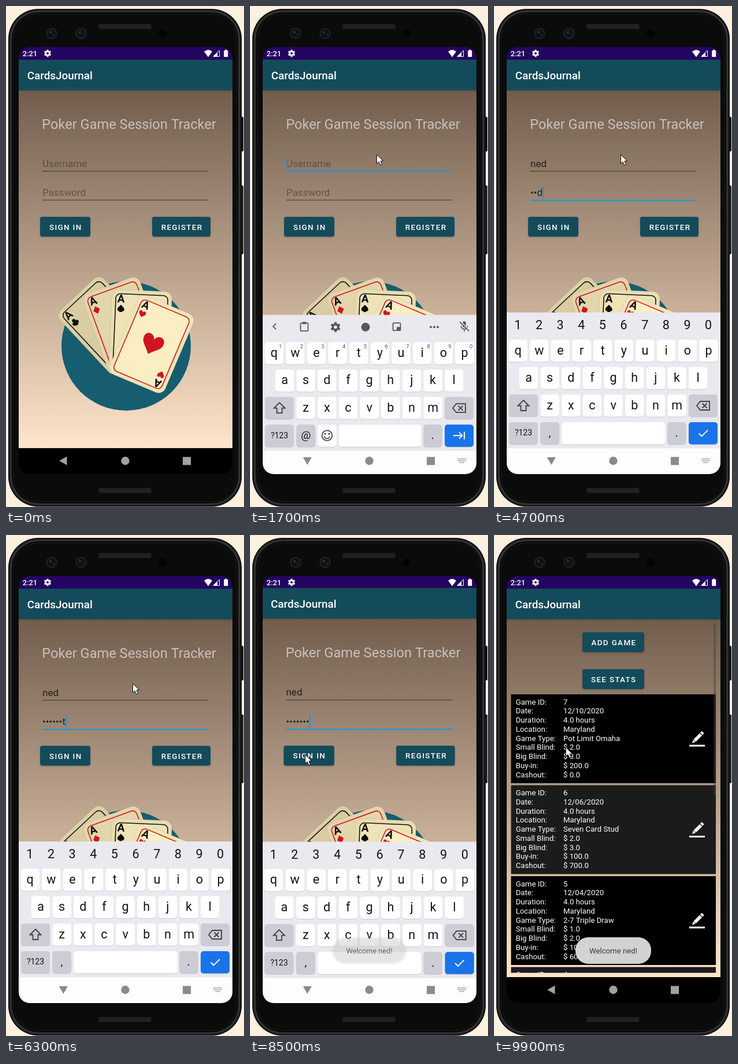
An HTML page with a canvas that plays this animation: 412 by 868 pixels, repeating every 10000 ms.

```html
<!DOCTYPE html>
<html lang="en">
<head>
<meta charset="utf-8">
<title>Session tracker</title>
<style>
html, body { margin: 0; width: 100%; height: 100%; overflow: hidden; background: #fdf0df; }
canvas { display: block; width: 412px; height: 868px; }
</style>
</head>
<body>
<canvas id="stage"></canvas>
<script>
const W = 412, H = 868, LOOP = 10000;
const cv = document.getElementById('stage'), c = cv.getContext('2d');
const dpr = window.devicePixelRatio || 1;
cv.width = W * dpr;
cv.height = H * dpr;

const APP = 'CardsJournal', USER = 'ned', PASS = 'nedsuit';
const TEAL = '#144b5a', BLUE = '#2196d6', RED = '#d01421';
const USER_KEYS = [2400, 2600, 2800];
const PASS_KEYS = [4000, 4350, 4600, 5000, 5400, 5800, 6200];
const FOCUS = 1300, NEXT = 3500, OPEN = 8450;

const clamp = v => Math.max(0, Math.min(1, v));
const span = (t, a, b) => clamp((t - a) / (b - a));
const ease = p => p * p * (3 - 2 * p);
const out = p => 1 - Math.pow(1 - p, 3);

function rect(x, y, w, h, fill) {
  c.fillStyle = fill;
  c.fillRect(x, y, w, h);
}
function round(x, y, w, h, r, fill) {
  c.beginPath();
  c.roundRect(x, y, w, h, r);
  if (fill) { c.fillStyle = fill; c.fill(); }
}
function ring(x, y, w, h, r, color, lw) {
  round(x, y, w, h, r);
  c.strokeStyle = color;
  c.lineWidth = lw;
  c.stroke();
}
function disc(x, y, r, fill) {
  c.beginPath();
  c.arc(x, y, r, 0, 7);
  c.fillStyle = fill;
  c.fill();
}
function trace(p, close) {
  c.beginPath();
  for (let i = 0; i < p.length; i += 2) c.lineTo(p[i], p[i + 1]);
  if (close) c.closePath();
}
function poly(p, fill) {
  trace(p, true);
  c.fillStyle = fill;
  c.fill();
}
function line(p, color, lw, close) {
  trace(p, close);
  c.strokeStyle = color;
  c.lineWidth = lw;
  c.stroke();
}
function text(s, x, y, size, color, weight = 400, align = 'left', gap = 0) {
  c.font = `${weight} ${size}px Roboto, sans-serif`;
  c.letterSpacing = gap + 'px';
  c.textAlign = align;
  c.fillStyle = color;
  c.fillText(s, x, y);
}
function layer(fn) {
  c.save();
  fn();
  c.restore();
}

function gear(x, y, r, color, hole) {
  disc(x, y, r * 0.75, color);
  layer(() => {
    c.translate(x, y);
    for (let i = 0; i < 6; i++) {
      rect(-r * 0.25, -r, r * 0.5, r * 0.5, color);
      c.rotate(Math.PI / 3);
    }
  });
  disc(x, y, r * 0.33, hole);
}

function phone() {
  rect(0, 0, W, H, '#fdf0df');
  round(405, 192, 6, 60, 2, '#111');
  round(405, 311, 6, 119, 2, '#111');
  rect(408.5, 314, 1, 112, '#444');
  round(4, 5, 404, 862.5, 52, '#0b0b0b');
  ring(7.5, 8.5, 397, 855.5, 49, '#2a2a2c', 3);
  ring(9, 10, 394, 852.5, 47.5, '#48484a', 1);
  ring(13, 14, 386, 844.5, 43.5, '#1b1b1c', 1);
  for (let y = 0; y < 2; y++) {
    [31, 835].forEach(top => {
      if (!y) round(160, top, 92, 9, 4, '#1e1e1e');
      c.setLineDash([1.5, 2]);
      line([164, top + 3 + 3 * y, 249, top + 3 + 3 * y], '#2e2e2e', 1.5);
      c.setLineDash([]);
    });
  }
  [79, 130].forEach(x => {
    disc(x, 47.5, 10, '#1d1e20');
    disc(x, 47.5, 7, '#0e0f12');
    disc(x - 2, 45.5, 2, '#34373d');
    disc(x + 3, 49.5, 1.6, '#2a2c31');
  });
  disc(271, 47.5, 7, '#030303');
}

function heart(s) {
  c.beginPath();
  c.moveTo(0, s);
  c.bezierCurveTo(-0.3 * s, 0.55 * s, -s, 0.2 * s, -s, -0.35 * s);
  c.bezierCurveTo(-s, -1.05 * s, -0.15 * s, -1.05 * s, 0, -0.45 * s);
  c.bezierCurveTo(0.15 * s, -1.05 * s, s, -1.05 * s, s, -0.35 * s);
  c.bezierCurveTo(s, 0.2 * s, 0.3 * s, 0.55 * s, 0, s);
  c.fill();
}
function pip(kind, x, y, s) {
  layer(() => {
    c.translate(x, y);
    const color = kind === 'heart' || kind === 'diamond' ? RED : '#0a0a0a';
    c.fillStyle = color;
    if (kind === 'heart') return heart(s);
    if (kind === 'diamond') return poly([0, -s * 1.15, s, 0, 0, s * 1.15, -s, 0], color);
    poly([0, 0, s * 0.45, s * 1.1, -s * 0.45, s * 1.1], color);
    if (kind === 'spade') {
      c.scale(1, -1);
      heart(s);
    } else {
      [[0, -0.5], [-0.52, 0.3], [0.52, 0.3]].forEach(p => disc(p[0] * s, p[1] * s, s * 0.5, color));
    }
  });
}
function card(x, y, deg, kind, rim, face) {
  layer(() => {
    c.translate(x, y);
    c.rotate(deg * Math.PI / 180);
    layer(() => {
      c.shadowColor = 'rgba(60,45,20,.22)';
      c.shadowBlur = 2 * dpr;
      round(-52, -74, 104, 148, 13, rim);
    });
    const ink = kind === 'heart' || kind === 'diamond' ? RED : '#111';
    round(-45, -67, 90, 134, 8, face);
    ring(-45, -67, 90, 134, 8, ink, 1.6);
    const corner = () => {
      text('A', -35.8, -52, 19, '#0a0a0a', 700, 'center');
      pip(kind, -35.5, -42, 6);
    };
    corner();
    if (kind === 'heart') {
      pip(kind, 1, -0.5, 18.5);
      c.rotate(Math.PI);
      corner();
    }
  });
}

function backdrop() {
  const g = c.createLinearGradient(0, 146, 0, 766);
  g.addColorStop(0, '#725d4d');
  g.addColorStop(1, '#ffe5ca');
  rect(22, 93, 370, 673, g);
  const s = c.createLinearGradient(0, 146, 0, 150);
  s.addColorStop(0, 'rgba(0,0,0,.12)');
  s.addColorStop(1, 'rgba(0,0,0,0)');
  rect(22, 146, 370, 4, s);
  rect(22, 71, 370, 22, '#240460');
  rect(22, 93, 370, 53, TEAL);
  text(APP, 36.7, 127, 18.85, '#fff', 500);
}
function button(x, y, w, label, tx) {
  layer(() => {
    c.shadowColor = 'rgba(0,0,0,.28)';
    c.shadowBlur = 2.5 * dpr;
    c.shadowOffsetY = dpr;
    round(x, y, w, 34.3, 3.8, TEAL);
  });
  text(label, tx, y + 22.3, 13.4, '#fff', 500, 'left', 1.35);
}

function field(y, value, hint, active, caret, composing) {
  if (value) text(value, 63, y - 7, 17, '#24201b');
  else text(hint, 63, y - 7, 17, 'rgba(50,38,26,.52)');
  c.font = '400 17px Roboto, sans-serif';
  const end = 63 + (value ? c.measureText(value).width : 0);
  if (composing) rect(63, y - 5.5, end - 63, 1, '#24201b');
  if (active) rect(63, y - 0.2, 287, 2.1, BLUE);
  else rect(63, y - 0.4, 287, 1.4, 'rgba(40,30,20,.55)');
  if (caret) rect(end + 0.3, y - 24.5, 2, 23, BLUE);
}

const typed = (keys, t) => keys.filter(k => k <= t).length;
function blink(t, marks) {
  const last = Math.max(...marks.filter(m => m <= t));
  return (t - last) % 1000 < 500;
}
function secret(t) {
  const n = typed(PASS_KEYS, t);
  if (!n) return '';
  const shown = t - PASS_KEYS[n - 1] < 1200;
  return '•'.repeat(n - 1) + (shown ? PASS[n - 1] : '•');
}

function login(t) {
  backdrop();
  text('Poker Game Session Tracker', 62.3, 212.5, 23.62, '#c9c0ba');
  const onUser = t >= FOCUS && t < NEXT, onPass = t >= NEXT;
  const name = USER.slice(0, typed(USER_KEYS, t));
  field(286, name, 'Username', onUser, onUser && blink(t, [FOCUS, ...USER_KEYS]), onUser && name);
  field(336, secret(t), 'Password', onPass, onPass && blink(t, [NEXT, ...PASS_KEYS]));
  button(59, 365.3, 87, 'SIGN IN', 75);
  button(253, 365.3, 101, 'REGISTER', 268.7);
  disc(208, 589, 112, '#165d70');
  card(174, 554, -43, 'club', '#dccfa4', '#d9cca2');
  card(204.5, 554, -20, 'diamond', '#e2d5a9', '#e2d6ac');
  card(232.5, 567, 2.5, 'spade', '#e9dcaf', '#efe3b8');
  card(252, 586, 23, 'heart', '#f1e4b8', '#faeec2');
}

const LABELS = ['Game ID:', 'Date:', 'Duration:', 'Location:', 'Game Type:',
  'Small Blind:', 'Big Blind:', 'Buy-in:', 'Cashout:'];
const GAMES = [
  ['7', '12/10/2020', 'Pot Limit Omaha', '2.0', '3.0', '200.0', '0.0'],
  ['6', '12/06/2020', 'Seven Card Stud', '2.0', '3.0', '100.0', '700.0'],
  ['5', '12/04/2020', '2-7 Triple Draw', '1.0', '2.0', '100.0', '600.0'],
  ['4', '12/02/2020', 'Pot Limit Omaha', '1.0', '2.0', '100.0', '300.0']
];
function pencil(x, y) {
  rect(x - 13.5, y + 11.5, 27, 3, '#fff');
  layer(() => {
    c.translate(x, y);
    c.rotate(Math.PI / 4);
    rect(-2.8, -14.5, 5.6, 4, '#fff');
    rect(-2.8, -9.3, 5.6, 15, '#fff');
    poly([-2.8, 6.5, 2.8, 6.5, 0, 12], '#fff');
  });
}
function list() {
  backdrop();
  button(153, 168.6, 107, 'ADD GAME', 168.5);
  button(153, 232.6, 107, 'SEE STATS', 168);
  layer(() => {
    c.beginPath();
    c.rect(22, 146, 370, 612.5);
    c.clip();
    GAMES.forEach(([id, date, type, sb, bb, buy, cash], i) => {
      const y = 276 + i * 157.5;
      rect(29.5, y, 354.5, 154, i % 2 ? '#1c1b1c' : '#000');
      const values = [id, date, '4.0 hours', 'Maryland', type, '$ ' + sb, '$ ' + bb, '$ ' + buy, '$ ' + cash];
      values.forEach((v, k) => {
        const by = y + 17.6 + k * 15.75;
        text(LABELS[k], 37.7, by, 13.2, '#fff');
        text(v, 120, by, 13.2, '#fff');
      });
      pencil(351.5, y + 76);
    });
  });
  rect(380, 153, 4, 297, 'rgba(70,65,60,.45)');
}

function status() {
  text('2:21', 28.8, 87, 12.9, '#fff', 500);
  gear(72, 82, 6.2, '#fff', '#240460');
  c.beginPath();
  c.moveTo(350, 88.5);
  c.lineTo(343, 79);
  c.quadraticCurveTo(350, 73, 357, 79);
  c.fillStyle = '#fff';
  c.fill();
  poly([358, 88, 366, 80, 366, 88], '#fff');
  line([359, 87.5, 369.5, 77, 369.5, 87.5], '#fff', 1, true);
  rect(377.2, 77.2, 7, 11, '#fff');
  rect(379, 75.8, 3.4, 2, '#fff');
}

function key(x, y, w, fill, label, size = 21.5) {
  round(x, y + 1, w, 38.5, 5, '#c9cad1');
  round(x, y, w, 38.5, 5, fill);
  if (label) text(label, x + w / 2, y + 19 + size * 0.31, size, '#121314', 400, 'center');
}
function mic(x, y, off) {
  round(x - 2.8, y - 9, 5.6, 10.5, 2.8, '#55585d');
  c.strokeStyle = '#55585d';
  c.lineWidth = 1.6;
  c.beginPath();
  c.arc(x, y - 1, 5.6, 0, Math.PI);
  c.moveTo(x, y + 5);
  c.lineTo(x, y + 9);
  c.stroke();
  if (off) {
    line([x - 7, y - 9, x + 9, y + 7], '#e9e9ef', 2);
    line([x - 8, y - 8, x + 8, y + 8], '#55585d', 1.7);
  }
}
function strip(name) {
  const g = '#55585d';
  if (name) {
    disc(45, 552, 14.5, '#d3d4da');
    disc(45, 551, 14.3, '#fff');
    line([43, 546.5, 47.5, 551, 43, 555.5], g, 1.8);
    text(name, 206, 558, 17, '#4a4c50', 400, 'center');
    return mic(372, 551, true);
  }
  line([45, 546, 40, 551, 45, 556], g, 1.8);
  ring(87.5, 545, 13, 14, 2, g, 1.8);
  rect(91, 543, 6, 4, g);
  gear(148, 552, 8.5, g, '#e9e9ef');
  disc(200, 552, 7.5, g);
  ring(247.5, 545, 13, 13, 2, g, 1.8);
  rect(254, 552, 6, 6, g);
  [313, 319, 325].forEach(x => disc(x, 552, 1.9, g));
  mic(371, 551, true);
}

function keyboard(pass, name) {
  rect(22, 531, 370, 236, '#e9e9ef');
  rect(22, 766.5, 370, 46, '#fdfdfd');
  if (pass) [...'1234567890'].forEach((d, i) => text(d, 41.3 + 36.65 * i, 560, 21.5, '#121314', 400, 'center'));
  else strip(name);
  const row = (letters, x, y) => [...letters].forEach((l, i) => key(x + 36.65 * i, y, 32.8, '#fff', l));
  row('qwertyuiop', 25.2, 578);
  if (!pass) [...'1234567890'].forEach((d, i) => text(d, 52.7 + 36.65 * i, 588.5, 9.4, '#4c4e52', 400, 'center'));
  row('asdfghjkl', 43.6, 625.5);
  row('zxcvbnm', 80.3, 673);
  const grey = '#cccdd4', ink = '#3c3e43';
  key(26, 673, 50, grey);
  line([51, 683, 60.5, 692.5, 55.5, 692.5, 55.5, 701, 46.5, 701, 46.5, 692.5, 41.5, 692.5], ink, 1.8, true);
  key(337, 673, 50, grey);
  line([351, 692.5, 357, 685, 373, 685, 373, 700, 357, 700], ink, 1.8, true);
  line([360.5, 688.5, 368.5, 696.5], ink, 1.8);
  line([368.5, 688.5, 360.5, 696.5], ink, 1.8);
  key(26, 721, 50, grey, '?123', 14);
  key(80.3, 721, 32.8, grey, pass ? ',' : '@', 19);
  if (pass) key(117, 721, 179, '#fff');
  else {
    key(117, 721, 32.8, '#fff');
    c.strokeStyle = ink;
    c.lineWidth = 1.7;
    c.beginPath();
    c.arc(133.4, 740, 8.8, 0, 7);
    c.stroke();
    c.beginPath();
    c.arc(133.4, 740.5, 4.8, 0.2, Math.PI - 0.2);
    c.stroke();
    disc(130, 737, 1.5, ink);
    disc(136.8, 737, 1.5, ink);
    key(153.4, 721, 142.6, '#fff');
  }
  key(300, 721, 32.5, grey, '.', 20);
  key(337, 721, 50, '#1a73e8');
  if (pass) line([354.5, 740.5, 359.5, 745.5, 370, 735], '#fff', 1.9);
  else {
    line([352, 740, 367, 740], '#fff', 1.9);
    line([362, 734.5, 367.5, 740, 362, 745.5], '#fff', 1.9);
    line([371, 733.5, 371, 746.5], '#fff', 1.9);
  }
}

function nav(t, up, light) {
  const color = light ? '#8a8a8a' : '#a2a2a2';
  layer(() => {
    c.translate(99.3, 788);
    c.rotate(-Math.PI / 2 * span(t, 1400, 1700) * (t < 8700 ? 1 : 0));
    poly([-7, 0, 6.2, -7.6, 6.2, 7.6], color);
  });
  disc(206.5, 788, 7.2, color);
  rect(306, 781.3, 14, 14, color);
  if (!up) return;
  for (let r = 0; r < 3; r++)
    for (let k = 0; k < 5; k++)
      if (r < 2 || (k > 0 && k < 4)) rect(359.5 + k * 3, 783.5 + r * 3.2, 2, 2, '#9c9c9e');
}

function toast(t) {
  const p = span(t, 8400, 8650);
  if (!p) return;
  layer(() => {
    c.translate(206.5, 720);
    const s = 0.94 + 0.06 * p;
    c.scale(s, s);
    c.globalAlpha = 0.94 * p;
    c.shadowColor = 'rgba(0,0,0,.25)';
    c.shadowBlur = 4 * dpr;
    round(-65.5, -23, 131, 46, 22, '#dfe1df');
    c.shadowColor = 'transparent';
    c.globalAlpha = Math.min(1, p * 1.8);
    text(`Welcome ${USER}!`, 0, 4.7, 13.2, '#3a3b3a', 400, 'center');
  });
}

// time, x, y of the pointer tip
const PATH = [[200, 414, 150], [1100, 219.5, 257.5], [6600, 219.5, 257.5], [7600, 89.5, 387],
  [7900, 89.5, 387], [8300, 95.5, 380.5], [8900, 95.5, 380.5], [9500, 133, 369], [9690, 133, 369],
  [9700, 124.5, 368], [LOOP, 124.5, 368]];
function pointer(t) {
  const i = PATH.findIndex(p => p[0] > t);
  if (i < 1) return;
  const [t0, x0, y0] = PATH[i - 1], [t1, x1, y1] = PATH[i];
  const p = ease(span(t, t0, t1));
  layer(() => {
    c.translate(x0 + (x1 - x0) * p, y0 + (y1 - y0) * p);
    c.lineJoin = 'round';
    const arrow = [0, 0, 0, 15.5, 3.6, 12.3, 6.2, 18.3, 9, 17.1, 6.4, 11.3, 11, 11];
    poly(arrow, '#fff');
    line(arrow, '#111', 1, true);
  });
}

function zoom(s, alpha, fn) {
  layer(() => {
    c.globalAlpha = alpha;
    c.translate(207, 419);
    c.scale(s, s);
    c.translate(-207, -419);
    fn();
  });
}

// Blends a drawing as one sheet, so overlapping parts do not show through.
const sheet = document.createElement('canvas');
const back = sheet.getContext('2d');
sheet.width = cv.width;
sheet.height = cv.height;
function fade(alpha, fn) {
  if (alpha >= 1) return fn();
  back.clearRect(0, 0, sheet.width, sheet.height);
  back.drawImage(cv, 0, 0);
  fn();
  c.setTransform(1, 0, 0, 1, 0, 0);
  c.globalAlpha = 1 - alpha;
  c.drawImage(sheet, 0, 0);
}

function draw(t) {
  c.setTransform(dpr, 0, 0, dpr, 0, 0);
  phone();
  layer(() => {
    round(22, 71, 370, 740, 19);
    c.clip();
    const swap = out(span(t, OPEN, 8900));
    const opening = t >= 8600;
    const lift = opening ? 1 + 0.1 * Math.pow(span(t, OPEN, 8700), 2) : 1 + 0.004 * span(t, OPEN, 8500);
    if (swap < 1) zoom(lift, 1, () => login(t));
    if (opening) zoom(0.88 + 0.12 * swap, 1, () => fade(span(t, 8500, 8800), list));
    status();
    rect(22, 766, 370, 46, '#000');
    const show = opening ? 1 - span(t, 8600, 8900) : span(t, 1350, 1750);
    if (show > 0) {
      const drop = opening ? (1 - show) * 200 : Math.pow(1 - show, 2) * 268;
      const name = USER.slice(0, typed(USER_KEYS, t));
      zoom(opening ? 1 : lift, 1, () => {
        c.translate(0, drop);
        fade(clamp(show * 1.25), () => keyboard(t >= NEXT + 100, name));
      });
    }
    nav(t, show > 0, show > 0.5);
    toast(t);
  });
  pointer(t);
}

const start = performance.now();
function tick() {
  const t = (performance.now() - start) % LOOP;
  draw(Math.floor(t / 100) * 100);
  requestAnimationFrame(tick);
}
tick();
</script>
</body>
</html>
```
